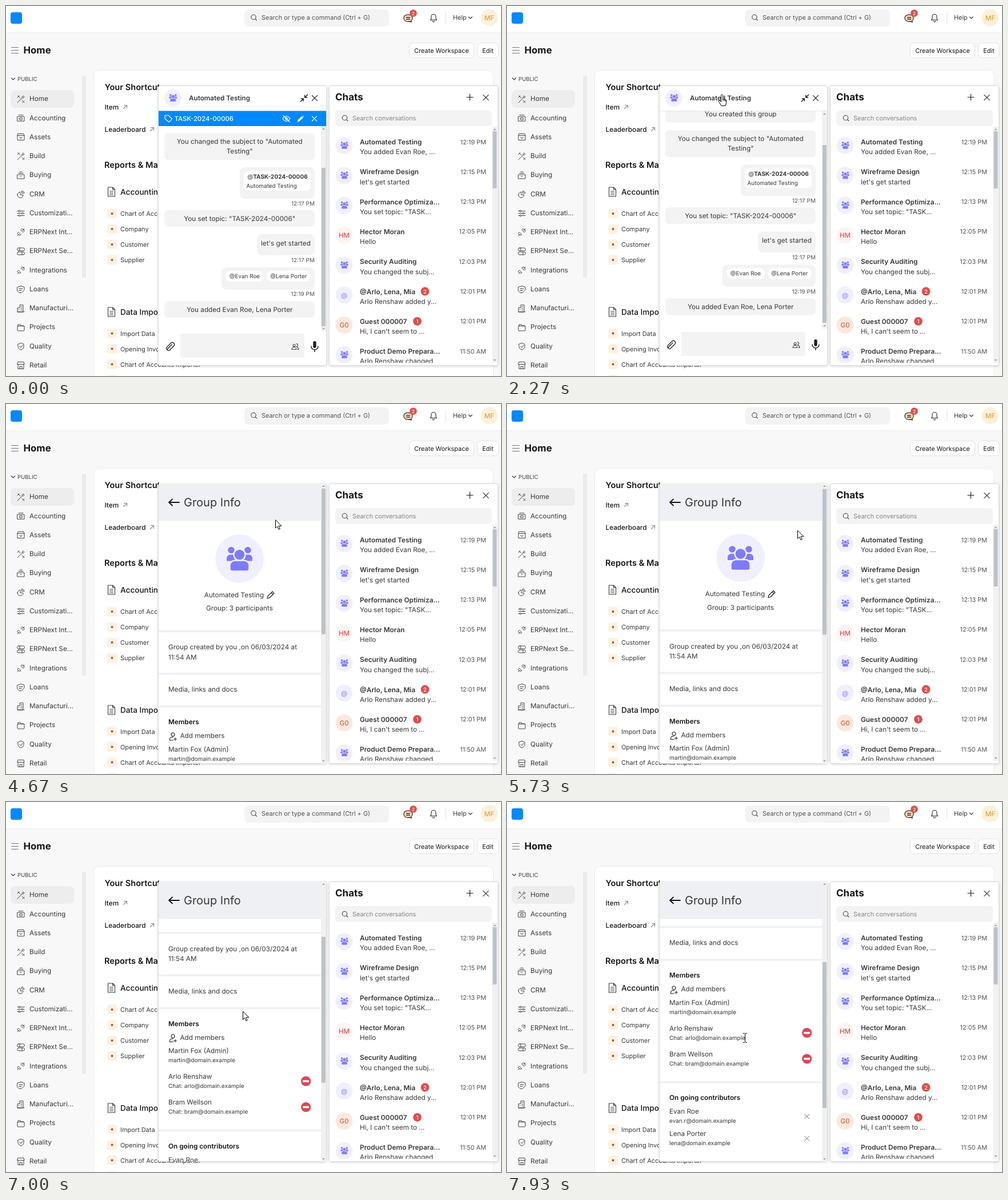
Write an HTML page that moves like this. It is 866 px wide and 647 px high and loops after 8000 ms.

```html
<!DOCTYPE html>
<html lang="en">
<head>
<meta charset="utf-8">
<title>Group chat</title>
<style>
html, body { margin: 0; height: 100%; overflow: hidden; background: #f8f8f8; }
svg { display: block; width: 100vw; height: 100vh; }
text { font-family: Inter, sans-serif; text-rendering: geometricPrecision; white-space: pre; }
.panel { filter: drop-shadow(0 1px 2px rgba(0,0,0,.18)); }
</style>
</head>
<body>
<svg id="stage" viewBox="0 0 866 647"></svg>
<script>
const INK = '#383838', DARK = '#171717', SOFT = '#f3f3f3', GREY = '#eff0f4',
      BLUE = '#0089ff', RED = '#e24c4c', LILAC = '#f0efff', VIOLET = '#7f7bff';

// Drawing helpers
const text = (x, y, s, size = 11.75, weight = 400, fill = INK, anchor = 'start') =>
  `<text x="${x}" y="${y}" font-size="${size}" font-weight="${weight}" fill="${fill}" text-anchor="${anchor}">${s}</text>`;
const rect = (x, y, x2, y2, fill, r = 0, extra = '') =>
  `<rect x="${x}" y="${y}" width="${x2 - x}" height="${y2 - y}" rx="${r}" fill="${fill}" ${extra}/>`;
const box = (x, y, x2, y2, r, stroke, extra = '') =>
  rect(x + .5, y + .5, x2 - .5, y2 - .5, '#fff', r, `stroke="${stroke}" ${extra}`);
const panel = (x, x2) => box(x, 139, x2, 629, 3, '#dcdcdc', 'class="panel"');
const circle = (x, y, r, fill) => `<circle cx="${x}" cy="${y}" r="${r}" fill="${fill}"/>`;
const line = (x, y, d, stroke = INK, width = 1.1, fill = 'none') =>
  `<path transform="translate(${x} ${y})" d="${d}" fill="${fill}" stroke="${stroke}" stroke-width="${width}" stroke-linecap="round" stroke-linejoin="round"/>`;
const group = (id, body, extra = '') => `<g id="${id}" ${extra}>${body}</g>`;
const cross = (x, y, r, color, width = 1.2) => line(x, y, `M${-r} ${-r}L${r} ${r}M${r} ${-r}L${-r} ${r}`, color, width);
const lens = (x, y) => line(x, y, 'M-4.2 0a4.2 4.2 0 1 0 8.4 0a4.2 4.2 0 1 0-8.4 0M3 3l2.5 2.5', '#444');
const people = (x, y, s) => `<g transform="translate(${x} ${y}) scale(${s})" fill="${VIOLET}">
  <circle cx="-14.5" cy="-15" r="5.8"/><circle cx="14.5" cy="-15" r="5.8"/>
  <path d="M-22.5 4V-1a6 6 0 0 1 6-6h33a6 6 0 0 1 6 6V4z"/>
  <g stroke="${LILAC}" stroke-width="2.4"><path d="M-17 18V12a9 9 0 0 1 9-9H8a9 9 0 0 1 9 9v6a4 4 0 0 1-4 4h-26a4 4 0 0 1-4-4z"/>
  <circle cy="-7" r="10"/></g></g>`;
const track = (x, y, y2) => rect(x, y, x + 9, y2, '#f1f1f1') +
  `<path d="M${x + 2} ${y + 6}l2.5-3 2.5 3zM${x + 2} ${y2 - 6}l2.5 3 2.5-3z" fill="#a3a3a3"/>`;
const thumb = (id, x, y, y2) => rect(x, y, x + 7, y2, '#bcc2c9', 0, `id="${id}"`);
const badge = (x, y, r, s) => circle(x, y, r, RED) + text(x, y + 3.5, s, r * 1.3, 500, '#fff', 'middle');
const clip = (id, x, y, x2, y2) => `<clipPath id="${id}">${rect(x, y, x2, y2, '#000')}</clipPath>`;

const PENCIL = 'M-6 6l1-4 8-8 3 3-8 8zM1-4l3 3';
const PLUG = 'M-6 6l2-2M6-6L3-3M-4 0l4 4-2 1-3-1-1-2zM0-4l4 4 2-2-1-3-3-1z';
const TOOLS = 'M-6 6L3-3M-5-6l4 4M2 2l4 4M2-4l2-2 2 2-2 2zM-6-3l3-3M3 6l3-3';
const MENU = [
  ['Home', TOOLS],
  ['Accounting', 'M-6-3h12v8h-12zM-4-5.5h8M-3 1a3 2 0 1 0 6 0a3 2 0 1 0-6 0M0 1h.1'],
  ['Assets', 'M-5-6h10l1 3v8h-12v-8zM-6-3h12M-2 0a2 2 0 0 0 4 0'],
  ['Build', TOOLS],
  ['Buying', 'M-6-1h12v7h-12zM-4-3.5h8M-2-6h4M-1 2h2'],
  ['CRM', 'M-6 1a5 5 0 1 0 10 0h-5v-5a5 5 0 0 0-5 5zM2-6a5 5 0 0 1 4 4h-4z'],
  ['Customizati...', 'M-6-4h2m3 0h7M-6 0h7m3 0h2M-6 4h2m3 0h7M-4-4a1.5 1.5 0 1 0 3 0a1.5 1.5 0 1 0-3 0M1 0a1.5 1.5 0 1 0 3 0a1.5 1.5 0 1 0-3 0M-4 4a1.5 1.5 0 1 0 3 0a1.5 1.5 0 1 0-3 0'],
  ['ERPNext Int...', PLUG],
  ['ERPNext Se...', 'M-4-6h8a2.5 2.5 0 0 1 0 5h-8a2.5 2.5 0 0 1 0-5zM-4 1h8a2.5 2.5 0 0 1 0 5h-8a2.5 2.5 0 0 1 0-5zM-2-6v5M2 1v5'],
  ['Integrations', PLUG],
  ['Loans', 'M-6-4l6-2 6 2v5l-5 5h-4l-3-3zM-3-1h6M-3 2h4'],
  ['Manufacturi...', 'M-6 6v-7h4v-5h6v12zM-6 6h12M0-3h2M0 0h2M0 3h2M-4 2h1'],
  ['Projects', 'M-6-2v7a1 1 0 0 0 1 1H5a1 1 0 0 0 1-1v-7zM-5-2v-3h4l1 2h5v1'],
  ['Quality', 'M-5-4l5-2 5 2v4c0 3-2 5-5 6c-3-1-5-3-5-6zM-2 0l2 2 3-4'],
  ['Retail', 'M-5-6h10l1 4h-12zM-5-2v8h10v-8M-2 6v-4h4v4'],
];

const navbar = rect(0, 0, 866, 46, '#fff') + rect(0, 46, 866, 47, '#ededed') +
  rect(8, 11, 28, 31, BLUE, 4) + rect(417, 6, 670, 36, SOFT, 7) + lens(433, 19.5) +
  text(447, 24, 'Search or type a command (Ctrl + G)', 10.9, 400, '#525252') +
  line(703.5, 21, 'M-6-4a9 7 0 0 1 12 0a6 6 0 0 1-1 9l1 2-4-1a8 7 0 0 1-7-1a6 6 0 0 1-1-9zM-3-1h6M-3 2h6', '#333', 1.3, '#f7d9b5') +
  badge(712.5, 12.5, 6.3, '2') +
  line(748, 20.5, 'M-5.5 4h11l-1.5-2.5v-3.5a4 4 0 0 0-8 0v3.5zM-1.5 6a1.5 1.5 0 0 0 3 0', '#222') +
  rect(769, 10, 770, 31, '#e2e2e2') + text(782, 24, 'Help', 10.9) + line(812.5, 20.5, 'M-3-1.5l3 3 3-3') +
  circle(845.5, 20.5, 15, '#fdf0d9') + text(845.5, 24.5, 'MF', 11.7, 400, '#dd932a', 'middle');

const sidebar = line(9.5, 77.5, 'M0-5h12M0 0h12M0 5h12', '#777', 1) + text(30.5, 83, 'Home', 16.8, 700, DARK) +
  line(12.5, 127.5, 'M-3-1.5l3 3 3-3') + text(20, 130.7, 'PUBLIC', 9.6, 400, '#444') +
  rect(8, 147, 119, 178, '#ededed', 8) + rect(133, 122, 140, 475, '#ebebeb') +
  MENU.map(([name, icon], i) => line(26, 163 + i * 33.25, icon, '#444', 1) +
    text(41, 166.3 + i * 33.25, name)).join('');

const button = (x, x2, s) => box(x, 64, x2, 91, 7, '#e2e2e2') +
  text((x + x2) / 2, 82, s, 10.9, 400, DARK, 'middle');
const links = (y, names) => names.map((name, i) => {
  const cy = y + i * 27;
  return rect(177, cy - 8.5, 194, cy + 8.5, '#fff1e2', 4) + circle(185.5, cy, 1.9, '#a6521a') + text(200, cy + 4, name, 10.95);
}).join('');
const card = (y, name) => text(200, y, name, 13.6, 500, DARK) +
  line(184.5, y - 5, 'M-6-8h8l4 4v12h-12zM2-8v4h4M-3-1h6M-3 2h6M-3 5h6');
const shortcut = (y, name, x) => text(172.5, y, name, 11.75, 500, DARK) + line(x, y - 4.5, 'M-3 3l6-6M-2-3h5v5', '#888');

const workspace = button(705, 819, 'Create Workspace') + button(824, 862, 'Edit') +
  box(153, 112, 853, 700, 9, '#ebebeb') +
  text(172.5, 147.2, 'Your Shortcuts', 14.6, 600, DARK) + shortcut(181, 'Item', 208.5) + shortcut(220, 'Leaderboard', 255.5) +
  text(172, 283.2, 'Reports &amp; Masters', 14.6, 600, DARK) +
  card(330, 'Accounting') + links(363, ['Chart of Accounts', 'Company', 'Customer', 'Supplier']) +
  card(540, 'Data Import and Settings') +
  links(572.5, ['Import Data', 'Opening Invoice Creation Tool', 'Chart of Accounts Importer', '']);

const CHATS = [
  ['', 'Automated Testing', 'You added Evan Roe, ...', '12:19 PM'],
  ['', 'Wireframe Design', "let's get started", '12:15 PM'],
  ['', 'Performance Optimiza...', 'You set topic: "TASK...', '12:13 PM'],
  ['HM', 'Hector Moran', 'Hello', '12:05 PM', '#fdf3f3', '#e03636'],
  ['', 'Security Auditing', 'You changed the subj...', '12:03 PM'],
  ['@', '@Arlo, Lena, Mia', 'Arlo Renshaw added y...', '12:01 PM', LILAC, VIOLET],
  ['G0', 'Guest 000007', "Hi, I can't seem to ...", '12:01 PM', '#fde8de', '#c5532b'],
  ['', 'Product Demo Prepara...', 'Arlo Renshaw changed', '11:50 AM'],
];
const chatRow = ([initials, name, message, time, bg = LILAC, fg], i) => {
  const y = 244 + i * 52.3;
  return circle(591.5, y, 15, bg) +
    (initials ? text(591.5, y + 4.2, initials, 11.6, 400, fg, 'middle') : people(592, y - .5, .3)) +
    text(619, y - 2, name, 11.85, 600) + text(619, y + 15.3, message) + text(840, y - 2.5, time, 10.9, 400, '#525252', 'end');
};
const chats = panel(565, 861) +
  text(576, 165.3, 'Chats', 17, 700, DARK) + line(811.5, 159.5, 'M-5.5 0h11M0-5.5v11', '#222', 1.2) + cross(839.5, 160, 4.7, '#333') +
  rect(576, 182, 850, 210, SOFT, 6) + lens(592.5, 195.5) + text(606, 200, 'Search conversations', 10.9, 400, '#858585') +
  group('list', CHATS.map(chatRow).join('') + badge(733, 499, 7.4, '2') + badge(719.5, 551.3, 7.4, '1'), 'clip-path="url(#listClip)"') +
  track(850.5, 211, 624) + thumb('listThumb', 851.5, 219, 319);

const notice = (y, y2, ...lines) => rect(277, y, 540, y2, SOFT, 7) +
  lines.map((s, i) => text(408.7, y + 18.7 + i * 17.5, s, 11.75, 400, INK, 'middle')).join('');
const bubble = (x, y, y2) => rect(x, y, 540, y2, SOFT, 9);
const stamp = (y, s) => text(540, y, s, 10, 400, '#525252', 'end');
const pill = (x, x2, s) => rect(x, 463, x2, 482, '#fff', 9) + text((x + x2) / 2, 476, s, 9.95, 400, INK, 'middle');
const messages = notice(179.5, 208.5, 'You created this group') +
  notice(222, 269, 'You changed the subject to "Automated', 'Testing"') +
  bubble(409, 282, 337) + rect(416, 289, 533, 323, '#fff', 8) +
  text(422.5, 302, '@<tspan font-weight="700">TASK-2024-00006</tspan>', 10.1) + text(420.5, 317.7, 'Automated Testing', 9.95) +
  stamp(348.5, '12:17 PM') + notice(357, 386, 'You set topic: "TASK-2024-00006"') +
  bubble(439, 399, 436) + text(446, 418.7, "let's get started") + stamp(448, '12:17 PM') +
  bubble(377, 457, 496) + pill(384, 451, '@Evan Roe') + pill(456, 533, '@Lena Porter') +
  stamp(507.3, '12:19 PM') + notice(516, 545, 'You added Evan Roe, Lena Porter');
const topic = rect(267, 183.5, 560, 210, BLUE) +
  line(284, 197, 'M-6-6h6l6.5 6.5-5.5 5.5-7-6zM-3.5-3.5h.1', '#fff') + text(294.7, 200.8, 'TASK-2024-00006', 11.3, 500, '#fff') +
  line(490.5, 197, 'M-6.5 0q6.5-9 13 0q-6.5 9-13 0zM-2 0a2 2 0 1 0 4 0a2 2 0 1 0-4 0M-5.5-5.5l11 11', '#fff', 1.2) +
  line(515.5, 197, 'M-5 5l1-3 6-6 2 2-6 6zM3.5-5l1.5 1.5', '#fff', 1, '#fff') + cross(539.5, 197, 4, '#fff');
const composer = rect(305, 573, 522, 615, SOFT, 3) +
  line(287, 595, 'M3-3l-7 7a2 2 0 0 0 3 3l8-8a3.6 3.6 0 0 0-5-5l-8 8a4 4 0 0 0 0 4', '#222', 1.3) +
  line(506, 595.5, 'M-6 5a4 4 0 0 1 8 0zM-4-2a2 2 0 1 0 4 0a2 2 0 1 0-4 0M2-5a2.3 2.3 0 0 1 0 5M3 1a4 4 0 0 1 3 4h-2', '#444') +
  rect(537.3, 586, 542.7, 598, '#222', 2.7) + line(540, 595, 'M-6 0a6 6 0 0 0 12 0M0 6v3.5', '#222', 1.5);
const chat = panel(266, 561) +
  group('view', group('messages', messages), 'clip-path="url(#chatClip)"') +
  group('barTopic', track(551, 210, 569) + thumb('', 552, 283, 560)) +
  group('barPlain', track(551, 184, 564) + thumb('', 552, 243, 554)) +
  rect(267, 183, 560, 184, '#e6e6e6') + circle(292, 161, 15, LILAC) + people(292.3, 160.5, .31) +
  text(320, 165, 'Automated Testing', 11.7, 600) +
  line(521.5, 161, 'M1.2-5v4h4M1.2-1l5-5M-1.2 5v-4h-4M-1.2 1l-5 5', '#222', 1.5) + cross(540, 161, 4.5, '#333') +
  group('topic', topic) + group('composer', composer);

const DOMAIN = '@domain.example';
const mail = (y, user) => text(284, y, user + DOMAIN, 10);
const member = (y, name, user) => text(284, y, name) + mail(y + 16, user);
const divider = y => rect(267, y, 551, y + 3.5, GREY);
const remove = y => circle(524.7, y, 8.6, '#df4655') + rect(519.2, y - 1.7, 530.2, y + 1.7, '#fff', 1);
const profile = circle(408.5, 269, 42.3, LILAC) + people(408.5, 269, 1) +
  text(399, 336, 'Automated Testing', 11.75, 400, INK, 'middle') + line(463, 332.5, PENCIL, '#222', 1.2) +
  text(408.5, 359.7, 'Group: 3 participants', 11.75, 400, INK, 'middle');
const details = divider(394.2) + text(284, 427.6, 'Group created by you ,on 06/03/2024 at') + text(284, 445.2, '11:54 AM') +
  divider(468.4) + text(284, 501.8, 'Media, links and docs') + divider(525.7) +
  text(284, 558.5, 'Members', 11.75, 600, DARK) +
  line(292, 580, 'M-5.5 6.5v-2a4 4 0 0 1 4-3.5h2M-3-3.5a3 3 0 1 0 6 0a3 3 0 1 0-6 0M-5.5 6.5h6M4 2v5M1.5 4.5h5', '#222') +
  text(304.5, 582.6, 'Add members') + member(606, 'Martin Fox (Admin)', 'martin') +
  member(651.3, 'Arlo Renshaw', 'Chat: arlo') + remove(655.2) + member(696.2, 'Bram Wellson', 'Chat: bram') + remove(700.5) +
  divider(739.7) + text(284, 772.8, 'On going contributors', 11.75, 600, DARK) +
  member(796.5, 'Evan Roe', 'evan.r') + cross(524.7, 801.3, 4, '#666', 1) + member(835, 'Lena Porter', 'lena') + cross(524.7, 840, 4, '#666', 1);
const info = panel(266, 561) +
  group('body', group('scroller', profile + group('details', details)), 'clip-path="url(#infoClip)"') +
  group('blank', rect(267, 396, 560, 628, GREY)) +
  rect(267, 139, 560, 204.5, GREY) + line(294, 172, 'M9 0h-18l6-5.5M-9 0l6 5.5', '#111', 1.8) + text(311, 178.8, 'Group Info', 20) +
  group('infoBar', track(551, 139, 629) + thumb('infoThumb', 552, 148.5, 403.5));

const pointers =
  group('arrow', line(.5, .5, 'M0 0v14l3.2-3 2.3 5.3 2.3-1-2.3-5.1h4.5z', '#000', 1, '#fff')) +
  group('hand', line(-3.5, .5, 'M5 13V2a1.6 1.6 0 0 1 3.2 0v6l5 1.2q1.5.5 1.3 2.3l-1 6-1 2.5h-7l-4-6.5q-1.5-2 0-2.8t3.5 2.3M8.2 8v3M10.7 9v2.5M12.8 9.5v2.5', '#000', 1, '#fff')) +
  group('beam', line(3.5, .5, 'M-3 0h2l1 1 1-1h2M0 1v14M-3 16h2l1-1 1 1h2', '#000', 1));

const stage = document.getElementById('stage');
stage.innerHTML = clip('listClip', 566, 211, 851, 624) + clip('chatClip', 267, 184, 551, 569) + clip('infoClip', 267, 204, 560, 629) +
  sidebar + workspace + navbar + chats + group('chat', chat) + group('info', info) + group('pointer', pointers);

// Motion: time runs in ticks of 1/15 s
const LOOP = 8000, TICK = 1000 / 15;
const PATH = [[7, 846, 584], [8, 610, 480], [9, 378, 395], [10, 432, 338], [11, 474, 309], [19, 474, 309],
  [21, 462, 290], [25, 392, 195], [28, 373, 154], [66, 373, 154], [67, 385, 158], [69, 440, 186], [71, 502, 219], [72, 508, 221],
  [93, 508, 221], [94, 515, 224], [97, 551, 262], [100, 505, 312], [103, 432, 355], [105, 414, 366], [106, 413, 367],
  [107, 411, 371], [108, 404, 390], [109, 398, 414], [110, 413, 404]];
const SCROLL = [[85, -1.5], [86, 0], [87, 14], [88, 42], [89, 76], [90, 107], [91, 145], [92, 167],
  [112, 167], [113, 169], [114, 183], [116, 225], [118, 249], [119, 251.5]];

function sample(keys, tick) {
  const i = keys.findIndex(key => key[0] >= tick);
  if (i <= 0) return keys[i ? keys.length - 1 : 0].slice(1);
  const [a, b] = [keys[i - 1], keys[i]], k = (tick - a[0]) / (b[0] - a[0]);
  return a.slice(1).map((v, j) => v + (b[j + 1] - v) * k);
}
const el = id => document.getElementById(id);
const show = (id, on) => el(id).setAttribute('display', on ? 'inline' : 'none');
const move = (id, x, y) => el(id).setAttribute('transform', `translate(${x} ${y})`);

function draw(tick) {
  const tagged = tick < 34, open = tick >= 55, loaded = tick >= 67;
  show('chat', !open);
  show('topic', tagged);
  show('barTopic', tagged);
  show('barPlain', !tagged);
  move('messages', 0, tagged ? 0 : -4.7);
  move('composer', 0, tagged ? 0 : -3);

  const [scroll] = sample(SCROLL, tick);
  show('info', open);
  show('blank', !loaded);
  show('details', loaded);
  show('infoBar', loaded);
  move('scroller', loaded ? 0 : 5, -scroll);
  move('infoThumb', 0, scroll * .523);

  const [x, y] = sample(PATH, tick);
  const hand = tick >= 27 && tick < 55, beam = tick >= 109;
  show('pointer', tick >= 7 && !(tick >= 60 && tick < 67));
  move('pointer', x, y);
  show('hand', hand);
  show('beam', beam);
  show('arrow', !hand && !beam);
}
function frame() {
  draw(Math.floor((performance.now() % LOOP + 4) / TICK) % 120);
  requestAnimationFrame(frame);
}
frame();
</script>
</body>
</html>
```
